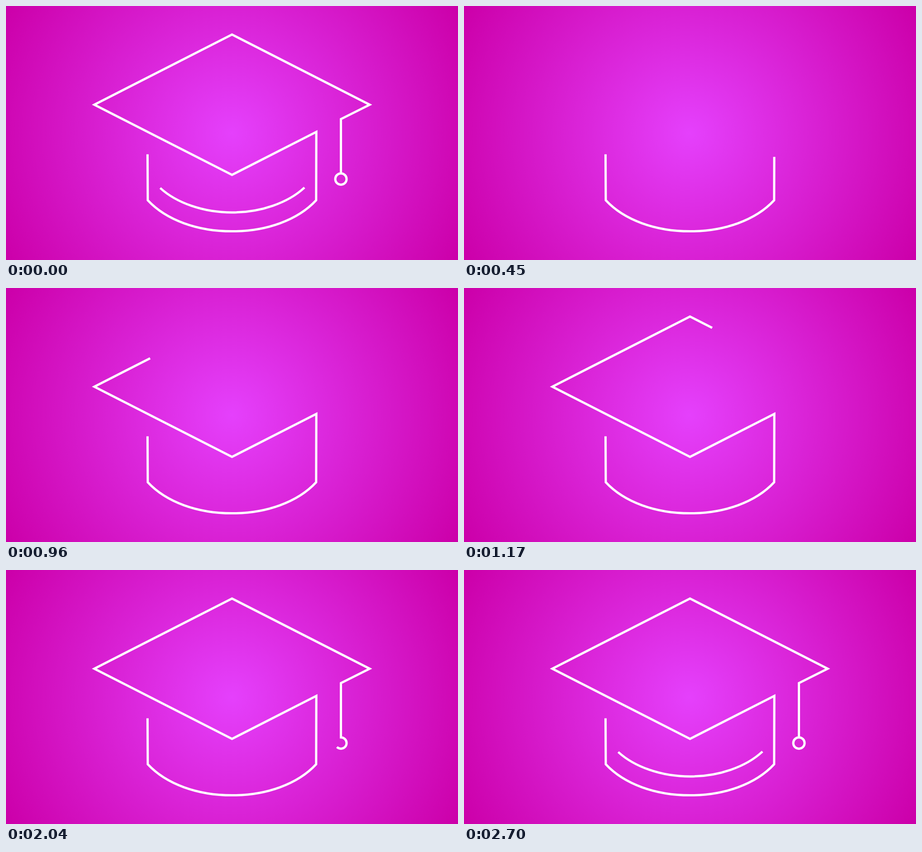
Animation, 998 px wide and 561 px high, one loop 4.56 s. Source, as an HTML page:

```html
<!DOCTYPE html>
<html lang="en">
<head>
<meta charset="utf-8">
<title>Graduation cap</title>
<style>
  html, body { margin: 0; width: 100%; height: 100%; overflow: hidden; }
  body { background: radial-gradient(circle 565px at 50% 50%, #e540fc, #cc00aa); }
  svg { display: block; width: 100%; height: 100%; }
  path { fill: none; stroke: #fff; stroke-width: 5; stroke-miterlimit: 10; }
</style>
</head>
<body>
<svg viewBox="0 0 998 561">
  <path id="cap" d="M312.5 327.5 L313 429 C354 473 423 497.6 499 497.6 S644 473 684.8 429
    L685.2 278 L499 373 L195 218 L499 63 L803 218 L739.5 249.7 V369.7
    a12.5 12.5 0 0 1 0 25 a12.5 12.5 0 0 1 0 -25"/>
  <path id="band" d="M340.5 402 C376 434.5 435 456 499 456 S623 434.5 659 401"/>
</svg>
<script>
  const LOOP = 4560, STEP = 30, BAND_START = 2160, BAND_TIME = 540;
  const cap = document.getElementById('cap');
  const band = document.getElementById('band');
  const capLen = cap.getTotalLength(), bandLen = band.getTotalLength();

  // Pen progress: time in ms, drawn length in px
  const pen = [
    [0, 0], [180, 194], [540, 745.6], [750, 1056], [1080, 1500.8], [1170, 1606],
    [1560, 1974], [1620, 2012], [2040, 2132], [2160, 2152], [2280, capLen]
  ];
  const last = pen.length - 1;
  const rate = i => (pen[i + 1][1] - pen[i][1]) / (pen[i + 1][0] - pen[i][0]);

  // Speed at a knot, weighted towards the shorter neighbouring span
  function slope(i) {
    if (i === 0) return 0.6;
    if (i === last) return 0;
    const a = pen[i][0] - pen[i - 1][0], b = pen[i + 1][0] - pen[i][0];
    return (rate(i - 1) * b + rate(i) * a) / (a + b);
  }

  function drawn(t) {
    if (t >= pen[last][0]) return capLen;
    const i = pen.findIndex((p, k) => t < pen[k + 1][0]);
    const [t0, a] = pen[i], [t1, b] = pen[i + 1];
    const h = t1 - t0, u = (t - t0) / h, v = 1 - u;
    return a * v * v * (1 + 2 * u) + b * u * u * (3 - 2 * u)
      + h * u * v * (slope(i) * v - slope(i + 1) * u);
  }

  function reveal(path, length, total) {
    path.style.visibility = length > 0 ? 'visible' : 'hidden';
    path.style.strokeDasharray = length >= total ? 'none' : `${length} 3000`;
  }

  function frame(now) {
    const t = Math.floor((now % LOOP) / STEP) * STEP;
    const done = t < STEP;
    const u = Math.min(1, Math.max(0, (t - BAND_START) / BAND_TIME));
    reveal(cap, done ? capLen : drawn(t), capLen);
    reveal(band, done ? bandLen : bandLen * drawn(u * pen[last][0]) / capLen, bandLen);
  }

  let start;
  function tick(now) {
    start ??= now;
    frame(now - start);
    requestAnimationFrame(tick);
  }
  frame(0);
  requestAnimationFrame(tick);
</script>
</body>
</html>
```
